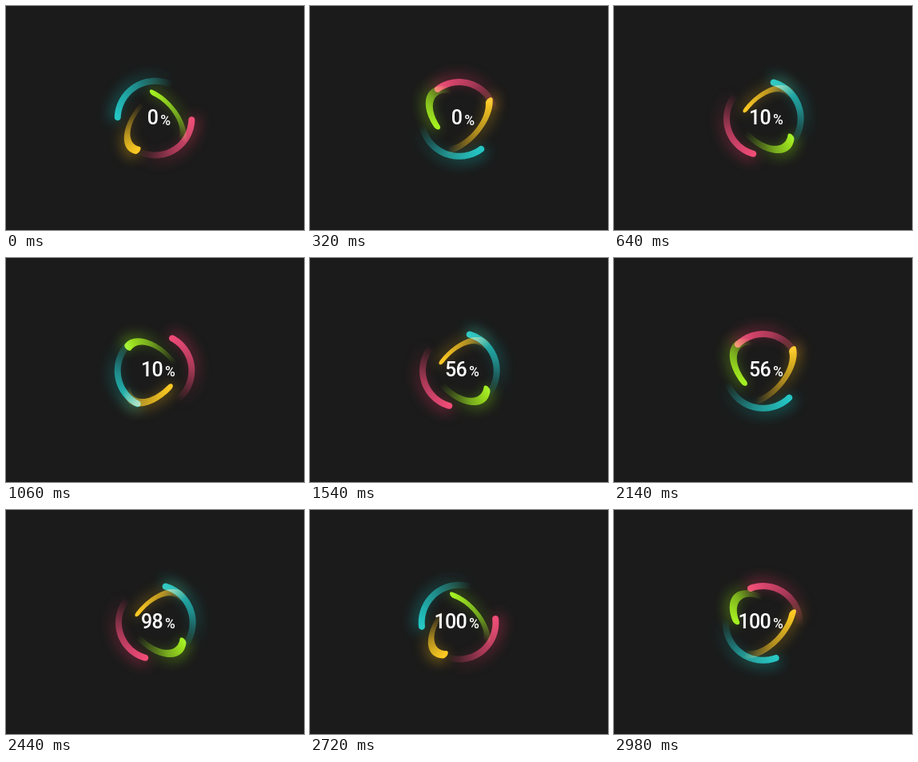
An HTML page with a canvas for the animation above (3 s loop, 373x280 px).

```html
<!DOCTYPE html>
<html lang="en">
<head>
<meta charset="utf-8">
<title>Loading rings</title>
<style>
  html, body { margin: 0; width: 100%; height: 100%; overflow: hidden; background: #1b1b1b; }
  canvas, svg { position: absolute; left: 0; top: 0; width: 373px; height: 280px; }
  text { font-family: Roboto, Arial, sans-serif; font-weight: 500; fill: #fff; }
  #count { font-size: 25px; letter-spacing: -0.7px; text-anchor: end; }
  #unit { font-size: 17.5px; }
</style>
</head>
<body>
<canvas id="stage" width="373" height="280"></canvas>
<svg viewBox="0 0 373 280">
  <g id="label">
    <text id="count" x="196" y="147.7">0</text>
    <text id="unit" x="199" y="148">%</text>
  </g>
</svg>
<script>
const LOOP = 3000, TURN = 900, STEP = 20;
const CX = 186.7, CY = 140.8, SWEEP = 115, DEPTH = 600;
const rad = deg => deg * Math.PI / 180;

// start: head angle at time 0; axis: direction of the long axis; flat: short / long axis
const rings = [
  { rgb: '252,188,12', start: 158.8, axis: -48.6, flat: 0.55, radius: 46.5, width: 10.5 },
  { rgb: '146,236,10', start: 233.4, axis: 47, flat: 0.58, radius: 45, width: 10.5 },
  { rgb: '234,50,96', start: 1.8, axis: 0, flat: 1, radius: 45.7, width: 8 },
  { rgb: '12,184,182', start: -178, axis: 0, flat: 1, radius: 47, width: 8 }
];

const counts = [[0, '0'], [640, '10'], [1540, '56'], [2440, '98'], [2720, '100']];

const ctx = document.getElementById('stage').getContext('2d');
const label = document.getElementById('label');
const count = document.getElementById('count');

function arcPath(head, radius, width, tilt) {
  const path = new Path2D(), half = width / 2;
  const add = (deg, r, along = 0) => {
    const c = Math.cos(rad(deg)), s = Math.sin(rad(deg));
    const x = r * c + along * s, y = r * s - along * c;
    const zoom = DEPTH / (DEPTH - y * tilt);
    path.lineTo(x * zoom, y * zoom);
  };
  for (let a = SWEEP; a >= 0; a -= 2) add(head + a, radius + half);
  for (let p = 0; p <= 180; p += 15) {
    add(head, radius + half * Math.cos(rad(p)), half * Math.sin(rad(p)));
  }
  for (let a = 0; a <= SWEEP; a += 2) add(head + a, radius - half);
  path.closePath();
  return path;
}

function fade(head, rgb, strength) {
  const g = ctx.createConicGradient(rad(head), 0, 0);
  const end = SWEEP / 360;
  [[0, 1], [end / 2, 0.62], [end, 0], [0.7, 0], [0.71, 1], [1, 1]].forEach(([at, alpha]) =>
    g.addColorStop(at, `rgba(${rgb},${alpha * strength})`));
  return g;
}

function drawRing(ring, t, glow) {
  const head = ring.start - 360 * t / TURN;
  const tilt = Math.sqrt(1 - ring.flat ** 2);
  ctx.save();
  ctx.translate(CX, CY);
  ctx.rotate(rad(ring.axis));
  ctx.scale(1, ring.flat);
  ctx.globalCompositeOperation = glow ? 'source-over' : 'screen';
  ctx.filter = glow ? 'blur(8px)' : 'none';
  ctx.fillStyle = fade(head, ring.rgb, glow ? 0.5 : 1);
  ctx.fill(arcPath(head, ring.radius + (glow ? 4 : 0), ring.width + (glow ? 2 : 0), tilt));
  ctx.restore();
}

function render(t) {
  ctx.fillStyle = '#1b1b1b';
  ctx.fillRect(0, 0, 373, 280);
  rings.forEach(r => drawRing(r, t, true));
  rings.forEach(r => drawRing(r, t, false));
  const value = counts.filter(([at]) => at <= t).pop()[1];
  count.textContent = value;
  label.setAttribute('transform', value === '0' ? 'translate(-5.7 0.8)' : '');
}

const begin = performance.now();
function tick() {
  const t = (performance.now() - begin) % LOOP;
  render(Math.floor(t / STEP) * STEP);
  requestAnimationFrame(tick);
}
tick();
</script>
</body>
</html>
```
